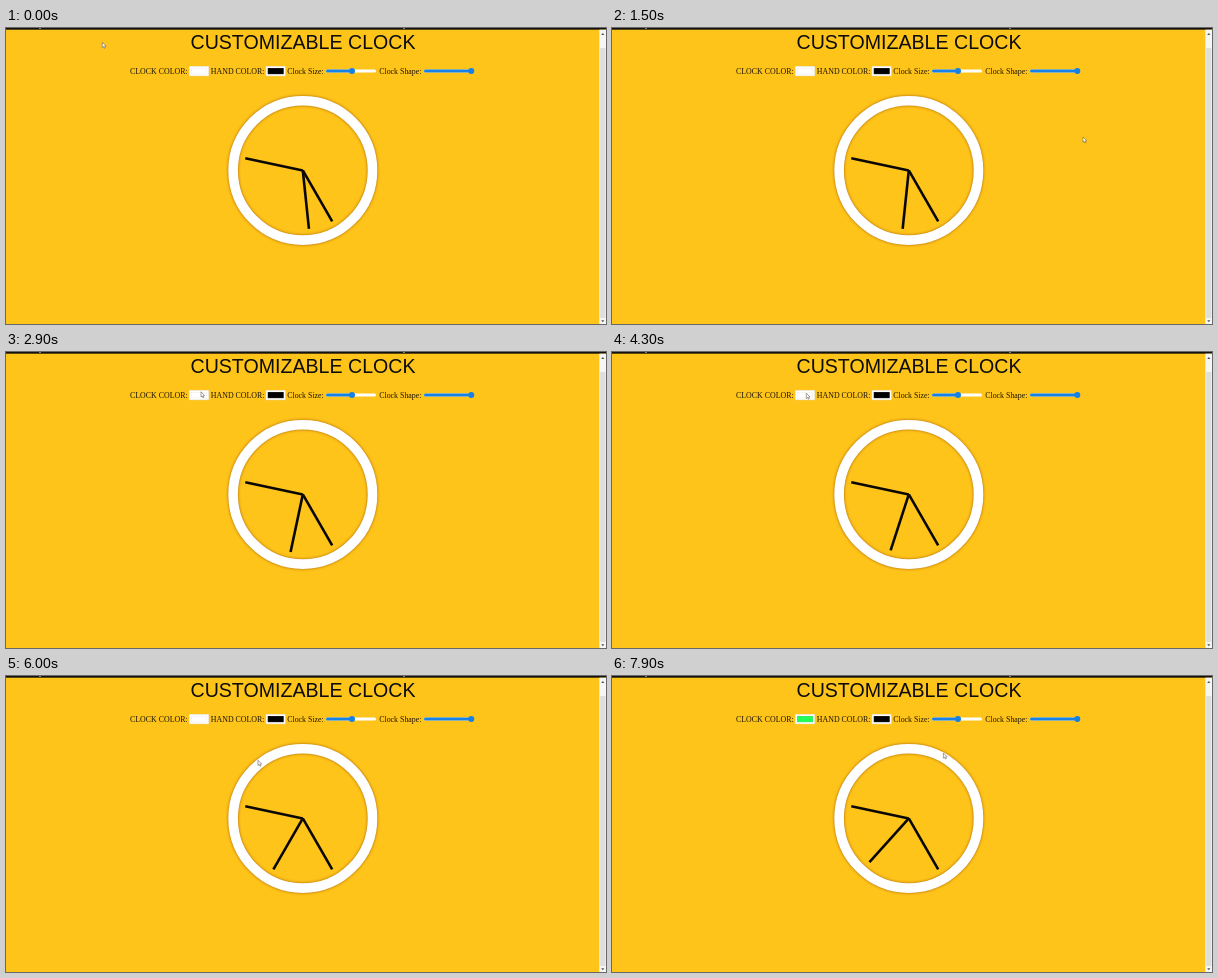
Animation of 600x296 px, one loop 8000 ms. Source, as an HTML page with a canvas:

```html
<!DOCTYPE html>
<html lang="en">
<head>
<meta charset="utf-8">
<title>Customizable clock</title>
<style>
  html, body { margin: 0; width: 100%; height: 100%; overflow: hidden; background: #ffc41a; }
  svg, canvas { position: absolute; left: 0; top: 0; width: 600px; height: 296px; }
  .title { font: 19.6px "Liberation Sans", Arial, sans-serif; fill: #0c0c0c; text-anchor: middle; }
  .label { font: 7.9px "Liberation Serif", "Times New Roman", serif; fill: #1c1404; }
</style>
</head>
<body>
<svg viewBox="0 0 600 296">
  <text class="title" x="297" y="20.5">CUSTOMIZABLE CLOCK</text>
  <g class="label">
    <text x="124" y="46">CLOCK COLOR:</text>
    <text x="204.8" y="46">HAND COLOR:</text>
    <text x="281.2" y="46">Clock Size:</text>
    <text x="373.2" y="46">Clock Shape:</text>
  </g>
</svg>
<canvas id="stage"></canvas>
<script>
const LOOP = 8000, STEP = 100;
const CX = 296.8, CY = 142.4;
const canvas = document.getElementById('stage');
const ctx = canvas.getContext('2d');
const ratio = window.devicePixelRatio || 1;
canvas.width = 600 * ratio;
canvas.height = 296 * ratio;

// Pointer stops: time, x, y
const stops = [
  [0, 96.3, 14.3], [900, 469, 104], [1500, 471, 109], [1800, 464, 98],
  [2250, 300, 17], [2700, 195, 40], [2900, 195, 39.8], [4300, 194.3, 41.2],
  [4500, 194.3, 41.2], [5300, 252.8, 53.2], [5500, 254, 57],
  [6500, 250, 111.5], [6800, 250, 111.5], [7900, 331.4, 77]
];

function rect(x, y, w, h, color) {
  ctx.fillStyle = color;
  ctx.fillRect(x, y, w, h);
}

function disc(x, y, r, color) {
  ctx.fillStyle = color;
  ctx.beginPath();
  ctx.arc(x, y, r, 0, Math.PI * 2);
  ctx.fill();
}

function bar(x1, x2, y, color) {
  ctx.strokeStyle = color;
  ctx.lineWidth = 3;
  ctx.lineCap = 'round';
  ctx.beginPath();
  ctx.moveTo(x1 + 1.5, y);
  ctx.lineTo(x2 - 1.5, y);
  ctx.stroke();
}

function triangle(x, y, dir) {
  ctx.fillStyle = '#555';
  ctx.beginPath();
  ctx.moveTo(x - 1.6, y + dir);
  ctx.lineTo(x + 1.6, y + dir);
  ctx.lineTo(x, y - dir);
  ctx.fill();
}

function swatch(x, color, edge) {
  rect(x, 38, 20, 10.2, '#e2d3a0');
  rect(x + 0.5, 38.5, 19, 9.2, '#fff');
  rect(x + 2, 40, 16, 6.2, edge);
  rect(x + 2.4, 40.4, 15.2, 5.4, color);
}

function slider(x, value) {
  const end = x + 50, knob = x + value;
  bar(x, end, 43, '#fff');
  bar(x, knob + 1.5, 43, '#1580e6');
  disc(knob, 43, 3, '#1580e6');
}

function frame() {
  rect(0, 0, 600, 1.7, '#14120e');
  rect(33, 0, 2, 0.9, '#888');
  rect(397, 0, 2, 0.9, '#888');
  rect(593.3, 1.7, 6.7, 294.3, '#f6f6f6');
  rect(594.2, 20, 5.2, 270, '#dedede');
  triangle(596.8, 6, 1);
  triangle(596.8, 293.3, -1);
}

function ring() {
  ctx.save();
  ctx.shadowColor = 'rgba(130, 60, 0, 0.75)';
  ctx.shadowBlur = 3 * ratio;
  ctx.strokeStyle = '#fff';
  ctx.lineWidth = 9.6;
  ctx.beginPath();
  ctx.arc(CX, CY, 69.7, 0, Math.PI * 2);
  ctx.stroke();
  ctx.restore();
}

function hand(degrees) {
  const a = degrees * Math.PI / 180;
  ctx.strokeStyle = '#0a0805';
  ctx.lineWidth = 2.6;
  ctx.lineCap = 'butt';
  ctx.beginPath();
  ctx.moveTo(CX, CY);
  ctx.lineTo(CX + 58.8 * Math.sin(a), CY - 58.8 * Math.cos(a));
  ctx.stroke();
}

function pointerAt(t) {
  let i = 0;
  while (i < stops.length - 2 && t >= stops[i + 1][0]) i++;
  const [t0, x0, y0] = stops[i], [t1, x1, y1] = stops[i + 1];
  const p = Math.min(1, (t - t0) / (t1 - t0));
  const e = p * p * (3 - 2 * p);
  return [x0 + (x1 - x0) * e, y0 + (y1 - y0) * e];
}

function pointer([x, y]) {
  ctx.save();
  ctx.translate(x, y);
  ctx.beginPath();
  ctx.moveTo(0, 0);
  ctx.lineTo(0, 5.2);
  ctx.lineTo(1.2, 4.2);
  ctx.lineTo(2, 6);
  ctx.lineTo(2.9, 5.6);
  ctx.lineTo(2.2, 3.9);
  ctx.lineTo(3.7, 3.8);
  ctx.closePath();
  ctx.fillStyle = '#fff';
  ctx.fill();
  ctx.strokeStyle = '#6b6254';
  ctx.lineWidth = 0.6;
  ctx.stroke();
  ctx.restore();
}

function draw(t) {
  ctx.setTransform(ratio, 0, 0, ratio, 0, 0);
  ctx.clearRect(0, 0, 600, 296);
  frame();
  const picked = t >= 7400;
  swatch(183, picked ? '#20ff58' : '#fff', picked ? '#4fd872' : '#e4e4e4');
  swatch(259.7, '#000', '#333');
  slider(320, 26);
  slider(418, 47.3);
  ring();
  const seconds = 30 + Math.floor((t - 480) / 1020);
  hand(150);
  hand(282);
  hand(seconds * 6);
  pointer(pointerAt(t));
}

const start = performance.now();
function tick(now) {
  const t = Math.max(0, now - start) % LOOP;
  draw(Math.floor(t / STEP) * STEP);
  requestAnimationFrame(tick);
}
draw(0);
requestAnimationFrame(tick);
</script>
</body>
</html>
```
